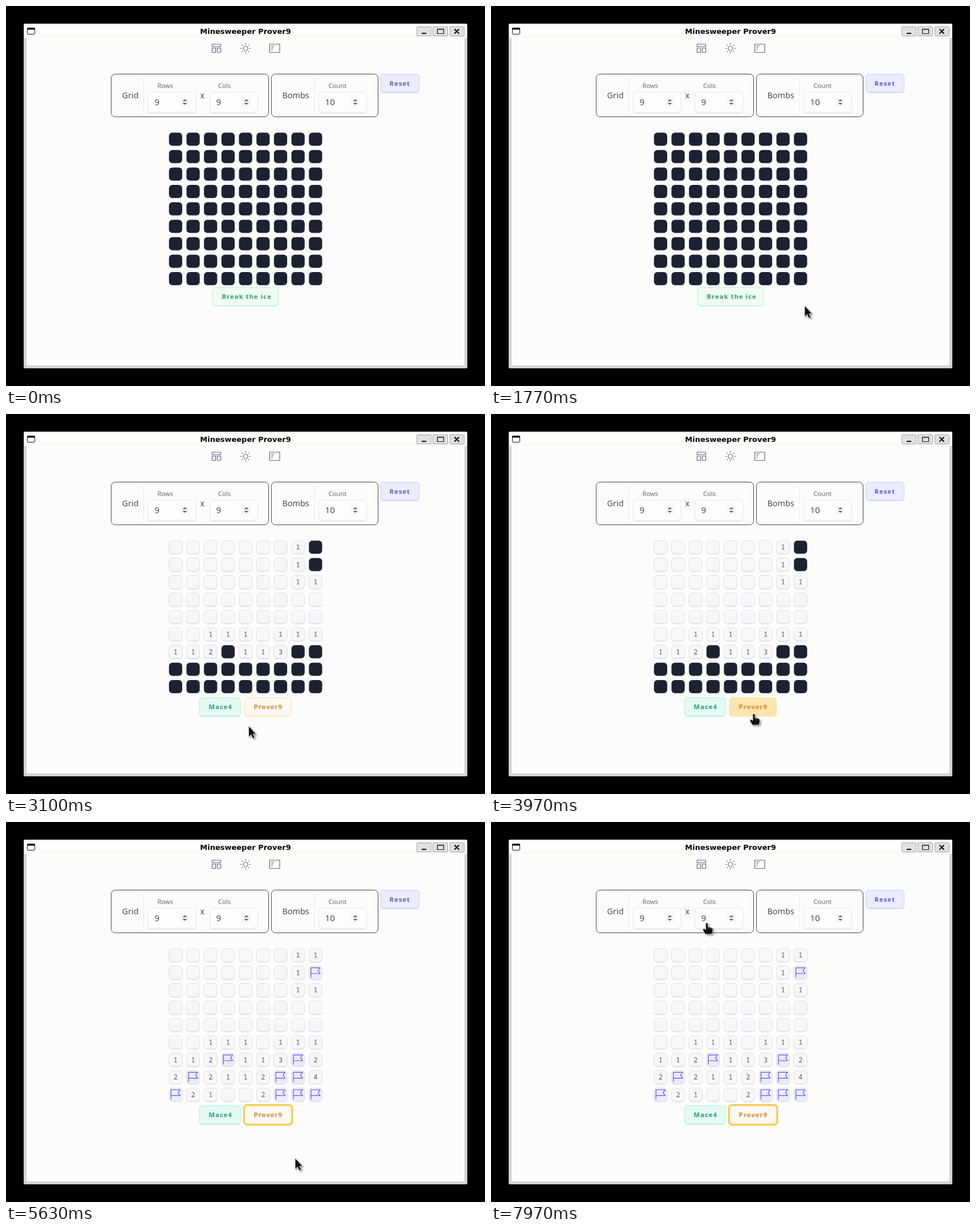
Animation, 840 px wide and 667 px high, one loop 8000 ms. Source, as an HTML page:

```html
<!DOCTYPE html>
<html lang="en">
<head>
<meta charset="utf-8">
<title>Minesweeper Prover9</title>
<style>
html, body { margin: 0; width: 100%; height: 100%; overflow: hidden; background: #000; }
svg { display: block; width: 840px; height: 667px; font-family: "Noto Sans", sans-serif; }
.title { font: bold 13px "DejaVu Sans", sans-serif; text-anchor: middle; }
.btn { font-weight: 600; font-size: 11.2px; letter-spacing: 1.1px; }
.num { font: 500 12px "Noto Sans Mono", monospace; text-anchor: middle; fill: #5c5d66; }
</style>
</head>
<body>
<svg id="stage" viewBox="0 0 840 667"></svg>
<script>
const LOOP = 8000;
const stage = document.getElementById('stage');

function add(parent, tag, attrs, text) {
  const el = document.createElementNS('http://www.w3.org/2000/svg', tag);
  for (const k in attrs) el.setAttribute(k, attrs[k]);
  if (text) el.textContent = text;
  parent.append(el);
  return el;
}
const box = (p, x, y, width, height, rx, fill, stroke = 'none') =>
  add(p, 'rect', { x, y, width, height, rx, fill, stroke });
const line = (p, d, stroke, w = 1, fill = 'none') =>
  add(p, 'path', { d, stroke, fill, 'stroke-width': w });
const label = (p, x, y, str, size, fill = '#4a4b54') =>
  add(p, 'text', { x, y, 'font-size': size, fill }, str);
const group = () => add(stage, 'g', {});
const show = (el, on) => el.setAttribute('visibility', on ? 'visible' : 'hidden');
const ramp = (t, a, b) => Math.max(0, Math.min(1, (t - a) / (b - a)));
const easeOut = u => 1 - (1 - u) * (1 - u);
const smooth = u => u * u * (3 - 2 * u);
const mix = (a, b, u) =>
  `rgb(${a.map((v, i) => Math.round(v + (b[i] - v) * u)).join()})`;

function drawWindow() {
  const g = group();
  box(g, 31, 31, 778, 605, 2, '#d3d3d6');
  box(g, 32, 31, 776, 20, 1, '#fefefd');
  box(g, 32, 50, 776, 6, 0, '#f9f9f5');
  box(g, 36, 56, 768, 575, 0, '#fcfcfb');
  box(g, 37.5, 38.5, 13, 11, 1, '#fff', '#111');
  line(g, 'M37 40H51', '#111', 3);
  add(g, 'text', { class: 'title', x: 420, y: 49 }, 'Minesweeper Prover9');
  for (const x of [720.5, 748.5, 778.5]) {
    box(g, x, 36.5, x === 748.5 ? 26 : 25, 16, 1, '#e2e2dc', '#a3a3b8');
  }
  line(g, 'M729 48H737', '#111', 2);
  line(g, 'M756.5 40.5H767.5V48.5H756.5ZM756 41H768', '#111', 1.2);
  line(g, 'M786.5 40.5L794.5 48.5M794.5 40.5L786.5 48.5', '#111', 2.2);
}

function drawIcons() {
  const g = group(), ink = '#65678c';
  line(g, 'M361.5 67H376.5V71.5H361.5ZM361.5 74H367.5V81.5H361.5ZM370.5 74H376.5V81.5H370.5Z', ink, 1.2);
  add(g, 'circle', { cx: 420, cy: 74.5, r: 4, fill: 'none', stroke: ink, 'stroke-width': 1.2 });
  for (let i = 0; i < 8; i++) {
    add(g, 'path', { d: 'M420 65.5V68', stroke: ink, 'stroke-width': 1.2,
      transform: `rotate(${i * 45} 420 74.5)` });
  }
  line(g, 'M462.5 67H480V81.5H462.5ZM465 70H471M465 73H469M465 76H468', ink, 1.2);
}

function field(g, x, name, nameX, value) {
  label(g, nameX, 144, name, 11.2, '#66676d');
  box(g, x, 152.5, 84, 36, 4, '#eeeef4');
  box(g, x, 151.5, 84, 35, 4, '#fdfdfe', '#e3e3ee');
  label(g, x + 11, 174, value, 15.2);
  box(g, x + 56, 161, 16, 15, 2, '#f5f5f8');
  line(g, `M${x + 60} 167l4-3.5 4 3.5zM${x + 60} 170l4 3.5 4-3.5z`, 'none', 0, '#666776');
}

function drawForm() {
  const g = group();
  box(g, 184.5, 119.5, 276, 75, 7, 'none', '#474752');
  box(g, 465.5, 119.5, 187, 75, 7, 'none', '#474752');
  line(g, 'M241.5 127V187M540.5 127V187', '#e9e9f2');
  label(g, 203.5, 162, 'Grid', 14.4);
  label(g, 484.5, 162, 'Bombs', 14.4);
  label(g, 340.8, 162, 'x', 14);
  field(g, 249.5, 'Rows', 265.5, '9');
  field(g, 357.5, 'Cols', 372, '9');
  field(g, 548.5, 'Count', 565.5, '10');
}

function button(x, y, w, str, textX, fill, stroke, ink) {
  const g = group();
  box(g, x, y + 1.5, w, 32, 5, stroke).setAttribute('opacity', .6);
  const face = box(g, x, y, w, 32, 5, fill, stroke);
  add(g, 'text', { class: 'btn', x: textX, y: y + 20, fill: ink }, str);
  return { g, face };
}

// '.' is empty, 'F' a flag
const board = [
  '.......11', '.......1F', '.......11', '.........', '.........',
  '..111.111', '112F113F2', '2F2112FF4', 'F21..2FFF'
];
const DARK = [29, 34, 50], GRAY = [218, 218, 223], PALE = [247, 247, 249], BLUE = [234, 236, 251];
const isLate = (r, c) => r > 6 || (r < 2 && c === 8) || (r === 6 && [3, 7, 8].includes(c));

function drawTiles() {
  const tiles = [];
  let late = 0;
  board.forEach((row, r) => [...row].forEach((mark, c) => {
    const g = group(), x = 285.8 + c * 30.68, y = 222.2 + r * 30.6;
    const shade = box(g, x, y + 1.5, 23.2, 23, 6, '#dcdce8');
    const face = box(g, x, y, 23.2, 23, 6, '#1d2232');
    let sign = null;
    if (mark === 'F') {
      sign = line(g, `M${x + 3.5} ${y + 20}V${y + 3}H${x + 19.5}L${x + 16} ${y + 8.1}L${x + 19.5} ${y + 13.2}H${x + 3.5}`, '#5a57e0', 1.2);
    } else if (mark !== '.') {
      sign = add(g, 'text', { class: 'num', x: x + 11.6, y: y + 15.8 }, mark);
    }
    const start = isLate(r, c) ? 4280 + 22 * late++ : 0;
    tiles.push({ face, shade, sign, start, end: mark === 'F' ? BLUE : PALE });
  }));
  return tiles;
}

function updateTile({ face, shade, sign, start, end }, t) {
  const begin = start || 2500;
  const a = easeOut(ramp(t, begin, begin + 200));
  const b = ramp(t, begin + 200, begin + 400);
  face.setAttribute('fill', b > 0 ? mix(GRAY, end, b) : mix(DARK, GRAY, a));
  face.setAttribute('stroke', b > 0 ? '#e0e0e8' : 'none');
  shade.setAttribute('opacity', .45 + .35 * b);
  if (sign) sign.setAttribute('opacity', b);
}

// time, x, y of the pointer tip
const path = [
  [1730, 553, 551], [1770, 550, 526], [2080, 445, 512], [2350, 412, 517],
  [2760, 412, 517], [3020, 420, 548], [3300, 447, 546], [3550, 461, 534],
  [3970, 461, 526], [4280, 461, 526], [4700, 490, 570], [5000, 507, 590],
  [6350, 507, 590], [6800, 584, 318], [6970, 604, 246], [7250, 604, 240],
  [7700, 462, 192], [7970, 378.5, 177]
];
function pointerAt(t) {
  let i = 1;
  while (i < path.length - 1 && path[i][0] < t) i++;
  const [t0, x0, y0] = path[i - 1], [t1, x1, y1] = path[i];
  const u = smooth(ramp(t, t0, t1));
  return [x0 + (x1 - x0) * u, y0 + (y1 - y0) * u];
}
const inside = (x, y, l, top, w, h) => x >= l && x <= l + w && y >= top && y <= top + h;

drawWindow();
drawIcons();
drawForm();
button(657.5, 119.5, 67, 'Reset', 672.5, '#e9edfd', '#c9d0fb', '#5c57d6');
const tiles = drawTiles();
const ice = button(362.5, 494, 115, 'Break the ice', 378.5, '#effdf3', '#b9ecdc', '#2f9d78');
const mace = button(339.5, 498, 71.5, 'Mace4', 355.5, '#e4fbf2', '#aeeeda', '#2b9d78');
const prover = button(418.5, 498, 82, 'Prover9', 434.5, '#fdf8f0', '#fbe0a4', '#d6842f');
const ring = add(prover.g, 'rect', { x: 417.3, y: 496.6, width: 84.8, height: 34.8, rx: 6,
  fill: 'none', stroke: '#fac944', 'stroke-width': 2.8 });

const cursor = group();
cursor.style.filter = 'drop-shadow(2px 2px 1.5px rgba(0,0,0,.4))';
const arrow = line(cursor, 'M0 0V19.5L4.4 15.4L7.4 22L10.8 20.6L7.9 14.2H13.3Z', '#f4f4f4', .8, '#111');
const hand = add(cursor, 'g', {});
line(hand, 'M-2 1Q0-1 2 1V7L5 7.5L8 8.5L10.5 10V15L8.5 20H-2.5L-7 13Q-7 10-4.5 10L-2 12Z', '#f4f4f4', .8, '#111');
line(hand, 'M2 8V11M5 8.5V11.5M8 9.5V12', '#888', .6);

function render(t) {
  const solved = t >= 2500;
  const [x, y] = pointerAt(t);
  const onIce = !solved && inside(x, y, 362, 494, 115, 33);
  const onMace = solved && inside(x, y, 339, 498, 73, 33);
  const onProver = solved && inside(x, y, 418, 498, 83, 33);
  const onInput = inside(x, y, 357, 151, 84, 36);
  const over = onIce || onMace || onProver || onInput;

  tiles.forEach(tile => updateTile(tile, t));
  show(ice.g, !solved);
  show(mace.g, solved);
  show(prover.g, solved);
  show(ring, t >= 4280);
  const live = t >= 1730;
  ice.face.setAttribute('fill', live && onIce ? '#cdf8e2' : '#effdf3');
  prover.face.setAttribute('fill', onProver ? '#fce6ad' : '#fdf8f0');

  cursor.setAttribute('transform', `translate(${x.toFixed(2)} ${y.toFixed(2)})`);
  show(arrow, live && !over);
  hand.setAttribute('display', live && over ? 'inline' : 'none');
}

const began = performance.now();
function tick() {
  render((performance.now() - began) % LOOP);
  requestAnimationFrame(tick);
}
tick();
</script>
</body>
</html>
```
